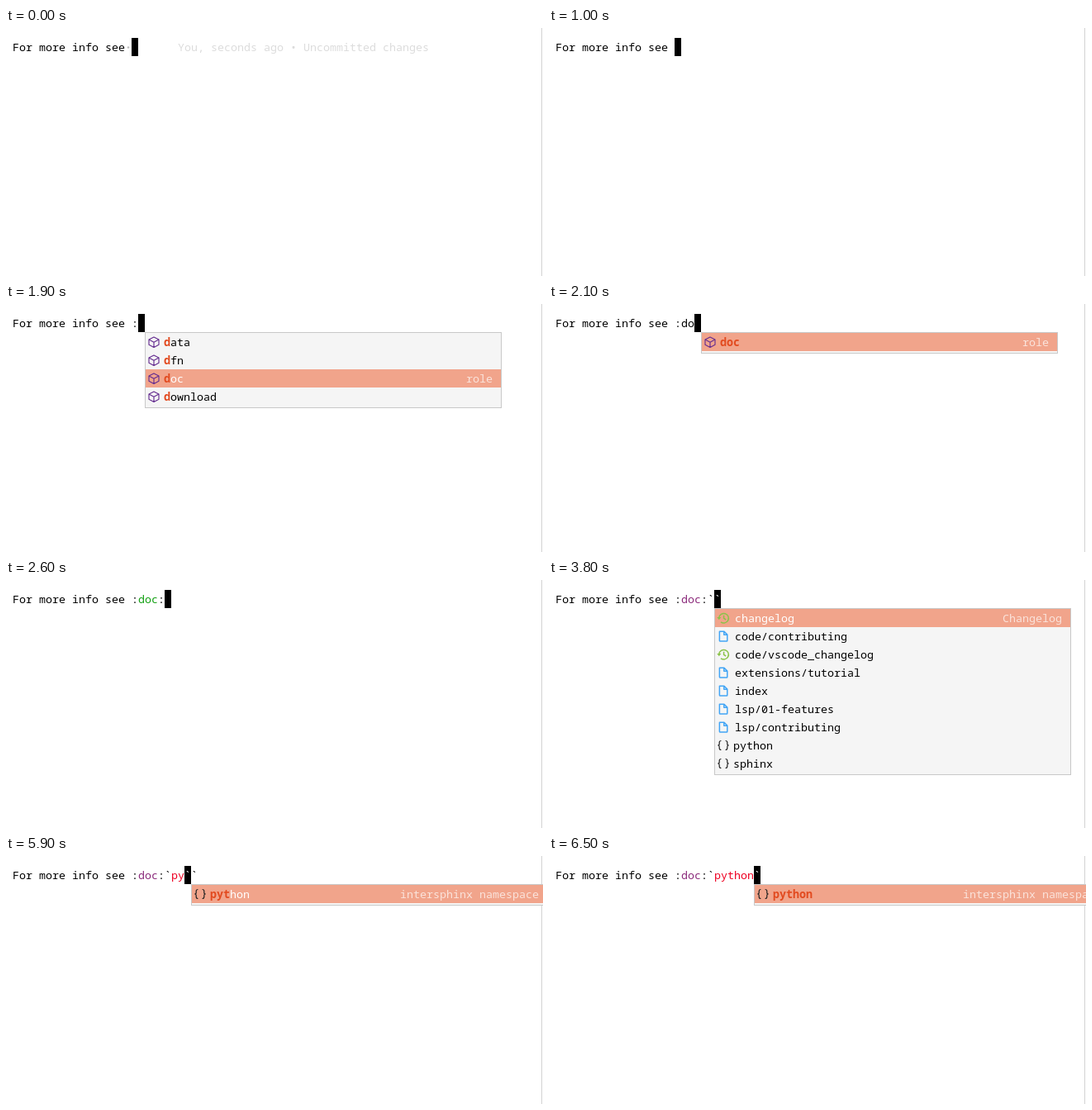
These frames come from a looping animation (650x300 px, 8000 ms). An HTML page:

```html
<!DOCTYPE html>
<html lang="en">
<head>
<meta charset="utf-8">
<title>Role completion</title>
<style>
  html, body { margin: 0; width: 100%; height: 100%; overflow: hidden; background: #fff; }
  svg { display: block; }
  text { font: 13.333px "Noto Sans Mono", "DejaVu Sans Mono", monospace; white-space: pre; }
  .hit { font-weight: bold; fill: #e24a1f; }
</style>
</head>
<body>
<svg id="stage" width="650" height="300" viewBox="0 0 650 300"></svg>
<script>
const LOOP = 8000, CELL = 8, ROW = 22, LEFT = 8;
const stage = document.getElementById('stage');
const col = n => LEFT + n * CELL;

const icons = {
  cube: `<path d="M0-6 6-3V3.2L0 6.4-6 3.2V-3ZM-6-3 0 .2 6-3M0 .2V6.4"
    fill="none" stroke="#652d90" stroke-width="1.15" stroke-linejoin="round"/>`,
  page: `<path d="M-4.6-5.8H1L4.8-2V5.2Q4.8 6 4 6H-3.8Q-4.6 6-4.6 5.2ZM.8-5.6V-1.8H4.6"
    fill="none" stroke="#42a5f5" stroke-width="1.5" stroke-linejoin="round"/>`,
  clock: `<path d="M-5.2-.5A5.8 5.8 0 1 1-3 4.8M.6-3.2V.4L3.2 2"
    fill="none" stroke="#8bc34a" stroke-width="1.5"/><path d="M-7.6-1H-2.6L-5.2 2.2Z" fill="#8bc34a"/>`,
  braces: `<path d="M-2.6-5.5Q-4.8-5.5-4.8-3.5V-1.7Q-4.8 0-6.6 0-4.8 0-4.8 1.7V3.5Q-4.8 5.5-2.6 5.5
    M2.6-5.5Q4.8-5.5 4.8-3.5V-1.7Q4.8 0 6.6 0 4.8 0 4.8 1.7V3.5Q4.8 5.5 2.6 5.5"
    fill="none" stroke="#222" stroke-width="1.2"/>`
};

const kind = (icon, names) => names.split(' ').map(name => ({ icon, name }));
const roles = kind('cube', 'doc download emphasis envvar eq exc file func guilabel index kbd keyword');
const dRoles = kind('cube', 'data dfn doc download');
const docs = kind('page', 'changelog code/contributing code/vscode_changelog extensions/tutorial ' +
  'index lsp/01-features lsp/contributing');
for (const d of docs) if (d.name.endsWith('changelog')) d.icon = 'clock';
const spaces = kind('braces', 'python sphinx');

const PREFIX = 'For more info see ';
const base = PREFIX.length;

// Popup for a typed prefix of a role name
function roleList(typed) {
  const items = dRoles.filter(r => r.name.startsWith(typed));
  return { at: base + 1 + typed.length, items, pick: items.findIndex(r => r.name === 'doc'),
    hit: typed.length, note: 'role' };
}

// The caret may trail the typed letters by one repaint
const typeRole = (n, caret) => ({
  text: [[':' + 'doc'.slice(0, n)]], caret: base + 1 + caret, list: roleList('doc'.slice(0, n))
});

const typeTarget = (n, caret) => ({
  text: [[':'], ['doc', '#8b2a7b'], [':`'], ['python'.slice(0, n), '#ee0022'], ['`']],
  caret: base + 6 + caret, under: '`',
  list: { at: base + 6 + n, items: n ? spaces.slice(0, 1) : [...docs, ...spaces], pick: 0, hit: n,
    note: n ? 'intersphinx namespace' : 'Changelog' }
});

const colon = { text: [[':']], caret: base + 1 };
const steps = [
  [0, { text: [], caret: base, idle: true }],
  [1000, { text: [], caret: base }],
  [1100, colon],
  [1200, { ...colon, list: { at: base + 1, items: roles, pick: 0, hit: 0, note: 'role', scroll: true } }],
  [1900, typeRole(1, 0)],
  [2000, typeRole(2, 1)],
  [2100, typeRole(3, 2)],
  [2200, typeRole(3, 3)],
  [2600, { text: [[':'], ['doc', '#12a012'], [':']], caret: base + 5 }],
  [3700, { ...typeTarget(0, -1), under: '', list: null }],
  [3800, typeTarget(0, 0)],
  [5400, typeTarget(1, 0)],
  [5500, typeTarget(1, 1)],
  [5700, typeTarget(2, 1)],
  [5800, typeTarget(2, 2)],
  [5900, typeTarget(3, 2)],
  [6000, typeTarget(4, 3)],
  [6100, typeTarget(5, 4)],
  [6200, typeTarget(5, 5)],
  [6400, typeTarget(6, 5)],
  [6500, typeTarget(6, 6)]
];

const rect = (x, y, w, h, fill, more = '') =>
  `<rect x="${x}" y="${y}" width="${w}" height="${h}" fill="${fill}" ${more}/>`;
const label = (x, y, body, fill = '#000', more = '') =>
  `<text x="${x}" y="${y}" fill="${fill}" ${more}>${body}</text>`;

function popup({ at, items, pick, hit, note, scroll }) {
  const x = col(at), y = 34;
  let out = rect(x + .5, y + .5, 431, items.length * ROW + 3, '#f5f5f5', 'stroke="#c8c8c8"');
  items.forEach(({ icon, name }, i) => {
    const top = y + 1 + i * ROW, on = i === pick;
    if (on) {
      out += rect(x + 1, top, 430, ROW, '#f1a48b');
      out += label(x + 421, top + 16, note, '#fae3db', 'text-anchor="end"');
    }
    out += `<g transform="translate(${x + 11} ${top + 11})">${icons[icon]}</g>`;
    const indent = icon === 'page' || icon === 'clock' ? 25 : 23;
    const body = hit ? `<tspan class="hit">${name.slice(0, hit)}</tspan>${name.slice(hit)}` : name;
    out += label(x + indent, top + 16, body, on ? '#fff' : '#000');
  });
  if (scroll) out += rect(x + 421, 92, 10, 63, '#bababa');
  return out;
}

function draw({ text, caret, under, idle, list }) {
  const spans = text.map(([s, fill = '#000']) => `<tspan fill="${fill}">${s}</tspan>`).join('');
  let out = rect(648, 0, 1, 300, '#d3d3d3') + label(LEFT, 28, PREFIX + spans);
  if (idle) {
    out += '<circle cx="148" cy="23.5" r="1.2" fill="#bbb"/>';
    out += label(208, 28, 'You, seconds ago • Uncommitted changes', '#dcdcdc');
  }
  out += rect(col(caret), 12, CELL, ROW, '#000');
  if (under) out += label(col(caret), 28, under, '#fff');
  if (list) out += popup(list);
  stage.innerHTML = out;
}

let shown;
const start = performance.now();
function tick() {
  const t = (performance.now() - start) % LOOP;
  const step = steps.findLast(([at]) => at <= t);
  if (step !== shown) draw((shown = step)[1]);
  requestAnimationFrame(tick);
}
tick();
</script>
</body>
</html>
```
